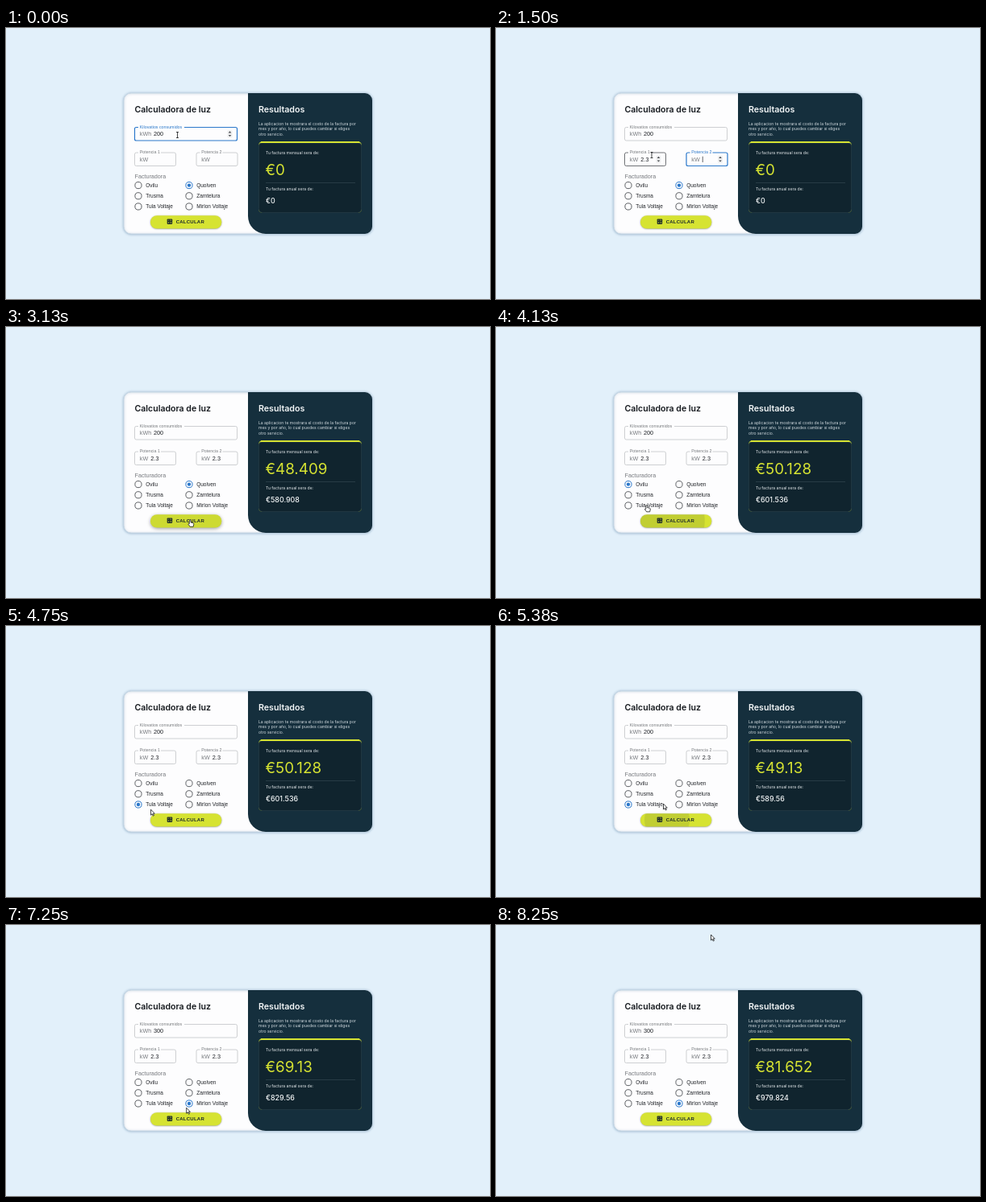
An HTML page with a canvas that plays this animation: 600 px wide and 337 px high, repeating every 8.38 s.

```html
<!DOCTYPE html>
<html lang="es">
<head>
<meta charset="utf-8">
<title>Calculadora de luz</title>
<style>
  html, body { margin: 0; width: 100%; height: 100%; overflow: hidden; background: #e2f0fa; }
  canvas { display: block; width: 600px; height: 337px; }
</style>
</head>
<body>
<canvas id="stage"></canvas>
<script>
const LOOP = 8380;
const canvas = document.getElementById('stage');
const ctx = canvas.getContext('2d');
const scale = window.devicePixelRatio || 1;
canvas.width = 600 * scale;
canvas.height = 337 * scale;

const SANS = '"Liberation Sans", Arial, sans-serif';
const ROUND = 'Inter, sans-serif';
const LIME = '#d6e332', BLUE = '#2b78cb', INK = '#222529', GREY = '#777a7e';
const suppliers = ['Ovilu', 'Quolven', 'Trusma', 'Zamtelura', 'Tula Voltaje', 'Mirlon Voltaje'];

// State tracks: [start time, value]
const focusTrack = [[0, 'energy'], [750, 'power1'], [1380, 'power2'], [2750, ''], [5880, 'energy'], [7130, '']];
const supplierTrack = [[0, 1], [3380, 0], [4500, 4], [7130, 5]];
const billTrack = [[0, 0], [2750, 48.409], [3880, 50.128], [5250, 49.13], [6630, 69.13], [7500, 81.652]];
const fields = [
  { id: 'energy', label: 'Kilovatios consumidos', unit: 'kWh', x: 159.5, y: 123.5, w: 127, notch: 57, textX: 183,
    values: [[0, '200'], [6250, '00'], [6380, '300']] },
  { id: 'power1', label: 'Potencia 1', unit: 'kW', x: 159.5, y: 155, w: 51, notch: 28, textX: 179.3, caret: true,
    values: [[0, ''], [1000, '2'], [1130, '2.'], [1250, '2.3']] },
  { id: 'power2', label: 'Potencia 2', unit: 'kW', x: 236, y: 155, w: 51, notch: 28, textX: 255.8, caret: true,
    values: [[0, ''], [1750, '2'], [1880, '2.'], [2000, '2.3']] }
];
const clicks = [[2750, 228], [3880, 205], [5250, 212], [7500, 215]];

// Pointer path: [time, x, y, shape]
const pointerPath = [
  [0, 212.5, 133, 'beam'], [380, 212.5, 133, 'beam'], [500, 205, 146, 'arrow'], [700, 193, 158, 'beam'],
  [1750, 193, 158, 'beam'], [2000, 198, 178, 'arrow'], [2450, 228, 240, 'hand'], [3130, 228, 240, 'hand'],
  [3250, 195, 216, 'arrow'], [3380, 165, 196, 'hand'], [3500, 165, 196, 'hand'], [3630, 186, 220, 'arrow'],
  [3750, 205, 240, 'hand'], [3880, 205, 240, 'hand'], [4130, 186.5, 221.5, 'hand'], [4400, 164, 222, 'hand'],
  [4630, 164, 222, 'arrow'], [5000, 212, 241, 'hand'], [5250, 212, 241, 'hand'], [5380, 207.5, 221, 'arrow'],
  [5800, 186.5, 131, 'beam'], [6750, 186.5, 131, 'arrow'], [7050, 227, 222, 'hand'], [7200, 227, 222, 'arrow'],
  [7380, 215, 241, 'hand'], [7880, 215, 241, 'hand'], [8000, 235, 120, 'arrow'], [8130, 262, 1, 'arrow'],
  [8250, 266.5, 12, 'arrow']
];
const pointerShapes = {
  arrow: new Path2D('M0 0V7L1.6 5.5L2.8 8L3.9 7.5L2.7 5.1H4.8Z'),
  hand: new Path2D('M0 0Q.9 -.5 1.1 .5V3L4.2 3.8Q5 4 4.8 5.2L4.2 8.3H.2L-2.1 5.2Q-1.9 4.1 -.7 4.8V.5Z'),
  beam: new Path2D('M-1.5 -3.5H1.5M0 -3.5V3.5M-1.5 3.5H1.5')
};

const latest = (track, t) => track.filter(entry => entry[0] <= t).pop();
const valueAt = (track, t) => latest(track, t)[1];

function pointerAt(t) {
  const from = latest(pointerPath, t);
  const to = pointerPath[pointerPath.indexOf(from) + 1] || from;
  const p = to === from ? 0 : (t - from[0]) / (to[0] - from[0]);
  return { x: from[1] + (to[1] - from[1]) * p, y: from[2] + (to[2] - from[2]) * p, shape: from[3] };
}

function text(str, x, y, size, color, family = SANS, weight = 400, spacing = 0) {
  ctx.font = `${weight} ${size}px ${family}`;
  ctx.letterSpacing = spacing + 'px';
  ctx.fillStyle = color;
  ctx.fillText(str, x, y);
}

function box(x, y, w, h, radius, fill, stroke, lineWidth = 1) {
  ctx.beginPath();
  ctx.roundRect(x, y, w, h, radius);
  if (fill) { ctx.fillStyle = fill; ctx.fill(); }
  if (stroke) { ctx.strokeStyle = stroke; ctx.lineWidth = lineWidth; ctx.stroke(); }
}

function circle(x, y, r, fill, stroke) {
  box(x - r, y - r, 2 * r, 2 * r, r, fill, stroke);
}

function shadow(color, blur, y) {
  ctx.shadowColor = color;
  ctx.shadowBlur = blur * scale;
  ctx.shadowOffsetY = y * scale;
}

const noShadow = () => shadow('transparent', 0, 0);

function drawCard() {
  ctx.fillStyle = '#e2f0fa';
  ctx.fillRect(0, 0, 600, 337);
  shadow('rgba(70,110,150,.45)', 3, 0.3);
  box(146, 81, 308, 175, 9, '#fdfdfe', '#c9d9e6', 1);
  noShadow();
  box(300, 81, 154, 175, [0, 9, 9, 22], '#152f3d');
  text('Calculadora de luz', 159.5, 104.7, 10.55, '#14181d', ROUND, 600);
  text('Resultados', 313, 104.7, 10.65, '#f4f7f8', ROUND, 600);
  ['La aplicacion te mostrara el costo de la factura por',
   'mes y por año, lo cual puedes cambiar si eliges',
   'otro servicio.'].forEach((line, i) => text(line, 313, 120.8 + i * 6.6, 5.05, '#d3dce0', ROUND));
}

function drawResults(t) {
  const bill = valueAt(billTrack, t);
  box(313, 141, 128, 89, 5, LIME);
  box(313, 143, 128, 87, [4, 4, 5, 5], '#10242e');
  box(313.4, 143, 127.2, 86.6, [4, 4, 5, 5], null, '#2a434e', 0.7);
  ctx.fillStyle = LIME;
  ctx.fillRect(316, 141, 122, 2);
  text('Tu factura mensual sera de:', 322, 157, 5.05, '#e5eaec', ROUND);
  text('€' + bill, 321.5, 183, 18.8, LIME, ROUND);
  ctx.fillStyle = '#2d434c';
  ctx.fillRect(322, 192, 111, 0.8);
  text('Tu factura anual sera de:', 322, 202.3, 5.05, '#e5eaec', ROUND);
  text('€' + Number((bill * 12).toFixed(3)), 322, 218.2, 8.9, '#f4f7f8', ROUND, 500);
}

function drawSpinner(x, y) {
  box(x - 3, y - 4.5, 6, 9, 1, '#eeeff0');
  ctx.fillStyle = '#484b4f';
  ctx.fill(new Path2D(`M${x - 1.8} ${y - 1.2}h3.6l-1.8 -2.2ZM${x - 1.8} ${y + 1.2}h3.6l-1.8 2.2Z`));
}

function drawField(field, t, pointer) {
  const { x, y, w } = field;
  const [focusStart, focusId] = latest(focusTrack, t);
  const focused = focusId === field.id;
  const hovered = pointer.x > x && pointer.x < x + w && pointer.y > y && pointer.y < y + 16.5;
  const value = valueAt(field.values, t);
  box(x, y, w, 16.5, 2, null, focused ? BLUE : hovered ? '#4c4f53' : '#c2c4c7', focused ? 1.2 : 0.8);
  ctx.fillStyle = '#fdfdfe';
  ctx.fillRect(x + 4.5, y - 1, field.notch, 2);
  text(field.label, x + 6.3, y + 1.3, 5.3, focused ? BLUE : GREY);
  text(field.unit, x + 6.3, y + 10.6, 7.2, GREY);
  text(value, field.textX, y + 10.8, 7.3, INK);
  if (focused && field.caret && Math.floor((t - focusStart) / 500) % 2 === 0) {
    ctx.fillStyle = INK;
    ctx.fillRect(field.textX + ctx.measureText(value).width, y + 4.7, 0.7, 7.3);
  }
  if (focused || hovered) drawSpinner(x + w - 9, y + 8.2);
}

function drawSuppliers(t) {
  const chosen = valueAt(supplierTrack, t);
  text('Facturadora', 159.5, 186.7, 7.2, GREY);
  suppliers.forEach((name, i) => {
    const x = 164 + (i % 2) * 63, y = 195.6 + (i >> 1) * 13.2;
    circle(x, y, 4.1, null, i === chosen ? BLUE : '#5d6064');
    if (i === chosen) circle(x, y, 2.2, BLUE);
    text(name, x + 9.2, y + 2.2, 6.5, INK);
  });
}

function drawButton(t, pointer) {
  const hovered = pointer.x > 179 && pointer.x < 267 && pointer.y > 233 && pointer.y < 249;
  shadow('rgba(0,0,0,.4)', hovered ? 4 : 2, hovered ? 1.2 : 0.5);
  box(179, 233.2, 88.3, 16.3, 8.1, LIME);
  noShadow();

  ctx.save();
  ctx.clip();
  for (const [start, x] of clicks) {
    const age = t - start;
    if (age < 0 || age > 480) continue;
    const fade = Math.min(1, (480 - age) / 230);
    circle(x, 241, age * 0.215, `rgba(20,40,50,${0.11 * fade})`);
  }
  ctx.restore();

  box(199.7, 237.4, 6.5, 6.5, 0.8, '#1d2a2c');
  ctx.strokeStyle = LIME;
  ctx.lineWidth = 0.55;
  ctx.stroke(new Path2D('M200.7 239.2h1.7M203.6 238.5l1.4 1.4m0 -1.4l-1.4 1.4M200.7 242.1h1.7m-.85 -.85v1.7M203.6 241.6h1.7m-1.7 1h1.7'));
  text('CALCULAR', 210.7, 243.2, 6, '#1d2a2c', SANS, 700, 0.25);
}

function drawPointer({ x, y, shape }) {
  ctx.save();
  ctx.translate(x, y);
  ctx.lineJoin = 'round';
  ctx.lineWidth = 0.8;
  ctx.strokeStyle = '#16181a';
  if (shape !== 'beam') {
    ctx.fillStyle = '#fff';
    ctx.fill(pointerShapes[shape]);
  }
  ctx.stroke(pointerShapes[shape]);
  ctx.restore();
}

function draw(now) {
  const step = Math.min(66, Math.floor((now % LOOP) / 125));
  const t = Math.round(step * 12.5) * 10;
  const pointer = pointerAt(t);
  ctx.setTransform(scale, 0, 0, scale, 0, 0);
  drawCard();
  drawResults(t);
  fields.forEach(field => drawField(field, t, pointer));
  drawSuppliers(t);
  drawButton(t, pointer);
  drawPointer(pointer);
}

let startTime;
function tick(now) {
  startTime ??= now;
  draw(now - startTime);
  requestAnimationFrame(tick);
}
draw(0);
requestAnimationFrame(tick);
</script>
</body>
</html>
```
